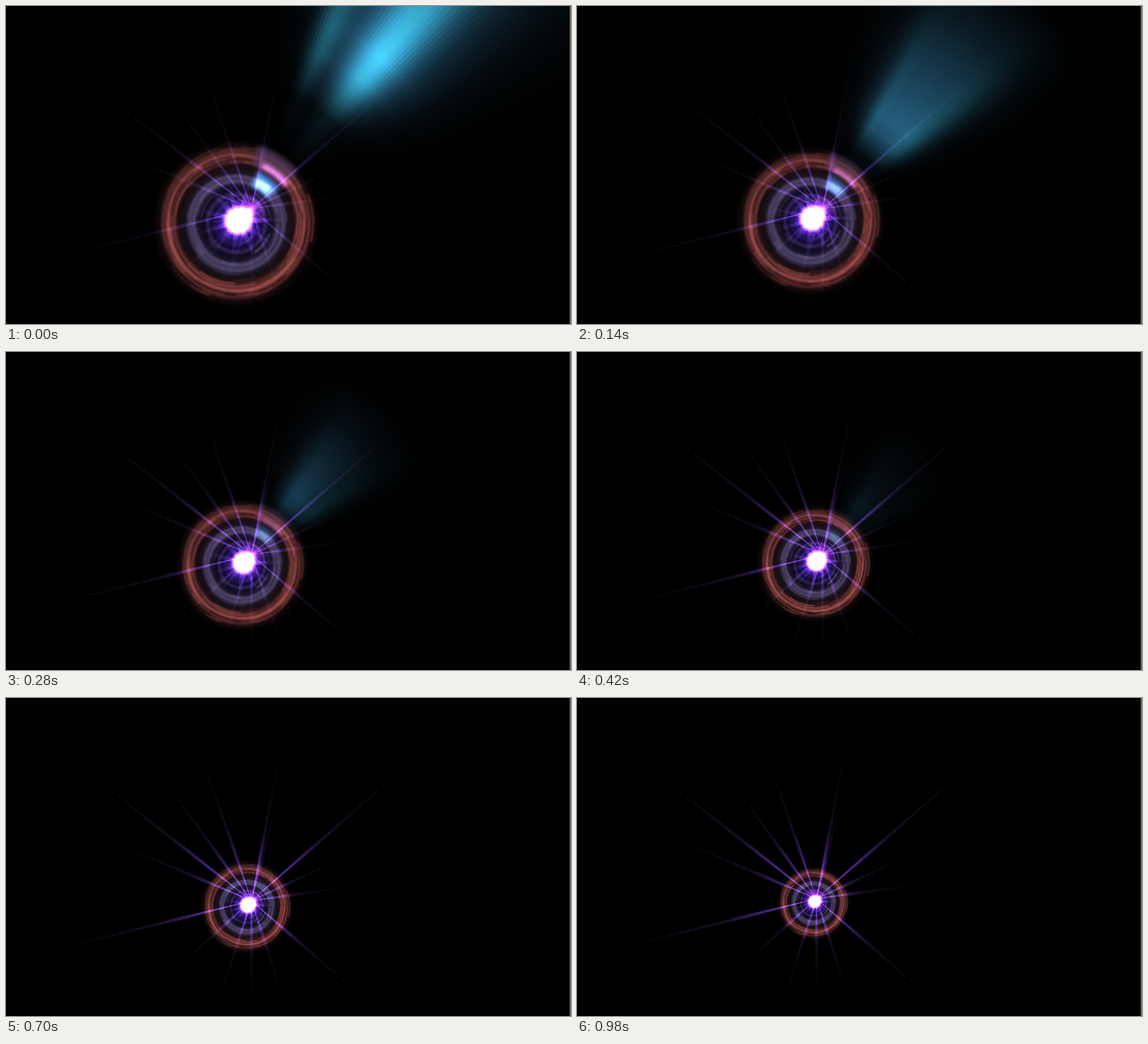
These frames come from a looping animation (854x480 px, 1.05 s). An HTML page with a canvas:

```html
<!DOCTYPE html>
<html lang="en">
<head>
<meta charset="utf-8">
<title>Light flare</title>
<style>
html, body { margin: 0; height: 100%; overflow: hidden; background: #000; }
canvas { display: block; }
</style>
</head>
<body>
<canvas id="stage" width="854" height="480"></canvas>
<script>
const ctx = document.getElementById('stage').getContext('2d');
const LOOP = 1050, STEP = 70, TAU = Math.PI * 2, DEG = Math.PI / 180;
const RED = [138, 68, 66], LAVENDER = [86, 74, 108], INDIGO = [28, 20, 84];

const rgba = (c, a = 1) => `rgba(${c.map(Math.round)},${a})`;
const bell = (v, mid, width) => Math.exp(-(((v - mid) / width) ** 2));

function seeded(seed) {
  return () => (seed = (seed * 16807) % 2147483647) / 2147483647;
}

function radial(x, y, r, stops) {
  const g = ctx.createRadialGradient(x, y, 0, x, y, r);
  stops.forEach(([p, c, a]) => g.addColorStop(p, rgba(c, a)));
  return g;
}

function glow(x, y, r, stops) {
  ctx.fillStyle = radial(x, y, r, stops);
  ctx.beginPath();
  ctx.arc(x, y, r, 0, TAU);
  ctx.fill();
}

// A fan of one-degree slices that is pulled in towards the flare and fades
function drawBeam(t, x, y) {
  const power = Math.min(1, 1.4 * (1 - t / 500));
  if (power <= 0) return;
  const lobes = Math.exp(-t / 150), spread = 1 - lobes;
  const reach = 70 + 230 * Math.exp(-t / 165), far = reach * 2.7;
  const profile = [[.3, 0], [.6, .12], [.85, .85], [1, 1], [1.5, .66], [2.1, .26], [2.7, 0]];
  for (let a = -84; a < -14; a++) {
    const bulk = bell(a, -51, 15) * power;
    const lobe = lobes * (bell(a, -50 + 19 * spread, 6.5) + .55 * bell(a, -67 + 11 * spread, 4));
    const c = [38 * bulk + 34 * lobe, 92 * bulk + 122 * lobe, 126 * bulk + 140 * lobe];
    ctx.fillStyle = radial(x, y, far, profile.map(([p, v]) => [p / 2.7, c, v]));
    ctx.beginPath();
    ctx.moveTo(x, y);
    ctx.arc(x, y, far, a * DEG, (a + 1) * DEG);
    ctx.fill();
  }
}

function arc(x, y, r, from, length, width, colour) {
  ctx.strokeStyle = colour;
  ctx.lineWidth = width;
  ctx.beginPath();
  ctx.arc(x, y, r, from, from + length);
  ctx.stroke();
}

// Disc colour at a distance from its centre, 1 being the rim
function ringColour(p) {
  const ripple = .85 + .15 * Math.sin(p * 80);
  const red = bell(p, .8, .1), lavender = bell(p, .53, .08) + .4 * bell(p, .35, .03);
  const indigo = bell(p, 0, .36);
  return RED.map((v, i) => ripple * (v * red + LAVENDER[i] * lavender + INDIGO[i] * indigo));
}

function drawDisc(x, y, R, light) {
  const stops = [];
  for (let p = 0; p <= 1; p += 1 / 64) stops.push([p, ringColour(p * 1.1), 1]);
  glow(x, y, R * 1.1, stops);

  const rnd = seeded(71), jitter = () => (rnd() - .5) * R * .03;
  ctx.globalCompositeOperation = 'source-over';
  ctx.filter = `blur(${R / 120}px)`;
  for (let i = 0; i < 110; i++) {
    const outer = i % 3, lit = rnd() < .5;
    const r = R * (outer ? .68 + rnd() * .25 : .2 + rnd() * .44);
    const c = lit ? (outer ? [176, 86, 82] : [112, 98, 146]) : [12, 6, 14];
    arc(x + jitter(), y + jitter(), r, rnd() * TAU, .2 + rnd() * .8,
      R * (.008 + rnd() * .02), rgba(c, .42));
  }
  // Sector lit by the beam
  ctx.filter = `blur(${R / 40}px)`;
  arc(x, y, R * .84, -1.3, .6, R * .24, rgba([82, 60, 96], light * .7));
  ctx.globalCompositeOperation = 'lighter';
  arc(x, y, R * .57, -1.18, .5, R * .2, rgba([50, 105, 175], light));
  arc(x, y, R * .55, -1.1, .32, R * .09, rgba([110, 140, 120], light));
  arc(x, y, R * .75, -1.14, .5, R * .065, rgba([190, 105, 195], light));
  ctx.filter = 'none';
}

// A thin tapered ray of light
function ray(x, y, angle, length, width, strength) {
  const dx = Math.cos(angle), dy = Math.sin(angle), mid = length * .3;
  ctx.fillStyle = radial(x, y, length, [
    [0, [190, 90, 255], strength], [.2, [120, 60, 230], strength * .7],
    [.4, [90, 50, 140], strength * .3], [1, [40, 24, 44], 0]]);
  ctx.beginPath();
  ctx.moveTo(x, y);
  ctx.lineTo(x + dx * mid - dy * width, y + dy * mid + dx * width);
  ctx.lineTo(x + dx * length, y + dy * length);
  ctx.lineTo(x + dx * mid + dy * width, y + dy * mid - dx * width);
  ctx.fill();
}

// Ray angles in degrees by length
const rays = {
  360: [-142, -41, 166],
  265: [-157, -126, -109, -79, 41],
  180: [-76, -25, -8, 72, 90, 108, 138]
};

function drawFlare(t, x, y, fx, fy, s) {
  const cx = x + 3 * s, cy = y - 4 * s, rnd = seeded(29);
  const strength = .5 + .35 * Math.min(1, t / 600);
  for (const length in rays)
    for (const a of rays[length])
      ray(fx, fy, a * DEG, +length, 2.4, strength * (.5 + length / 720));
  for (let i = 0; i < 34; i++) {
    const a = (i + rnd()) / 34 * TAU, big = i % 3 === 0;
    ray(cx, cy, a, (big ? 78 : 34 + rnd() * 30) * s, (big ? 4 : 1.8) * s, big ? 1 : .6);
  }
  glow(cx, cy, 52 * s, [[0, [150, 70, 255], .8], [.5, [80, 36, 190], .35], [1, [30, 10, 90], 0]]);
  glow(fx, fy, 14 + 14 * s, [[0, [255, 110, 255], .8], [.4, [180, 60, 210], .35], [1, [80, 20, 120], 0]]);
  glow(cx, cy, 25 * s, [[0, [255, 255, 255], 1], [.66, [255, 240, 255], 1],
    [.84, [225, 140, 255], .55], [1, [150, 50, 255], 0]]);
  glow((cx + fx) / 2 + 3, (cy + fy) / 2 - 1, 5 + 9 * s, [[0, [255, 255, 255], 1],
    [.5, [255, 210, 255], .7], [1, [220, 80, 255], 0]]);
}

function draw(t) {
  const s = Math.exp(-t / 1200), drift = Math.max(0, t - 700) / 280;
  const fx = 371 - 9 * drift, fy = 306 - 3 * drift;
  const x = fx - 23 * s ** 2, y = fy + 22 * s ** 1.5;
  ctx.globalCompositeOperation = 'source-over';
  ctx.fillStyle = '#000';
  ctx.fillRect(0, 0, 854, 480);
  ctx.globalCompositeOperation = 'lighter';
  drawBeam(t, fx, fy);
  drawDisc(x, y, 127 * s, Math.exp(-t / 300));
  drawFlare(t, x, y, fx, fy, s);
  ctx.globalCompositeOperation = 'source-over';
  ctx.fillStyle = '#060002';
  ctx.fillRect(0, 476, 852, 4);
  ctx.fillStyle = '#6a6a6a';
  ctx.fillRect(852, 0, 2, 480);
}

const start = performance.now();
let shown = -1;
function tick() {
  const t = Math.floor((performance.now() - start) % LOOP / STEP) * STEP;
  if (t !== shown) draw(shown = t);
  requestAnimationFrame(tick);
}
tick();
</script>
</body>
</html>
```
